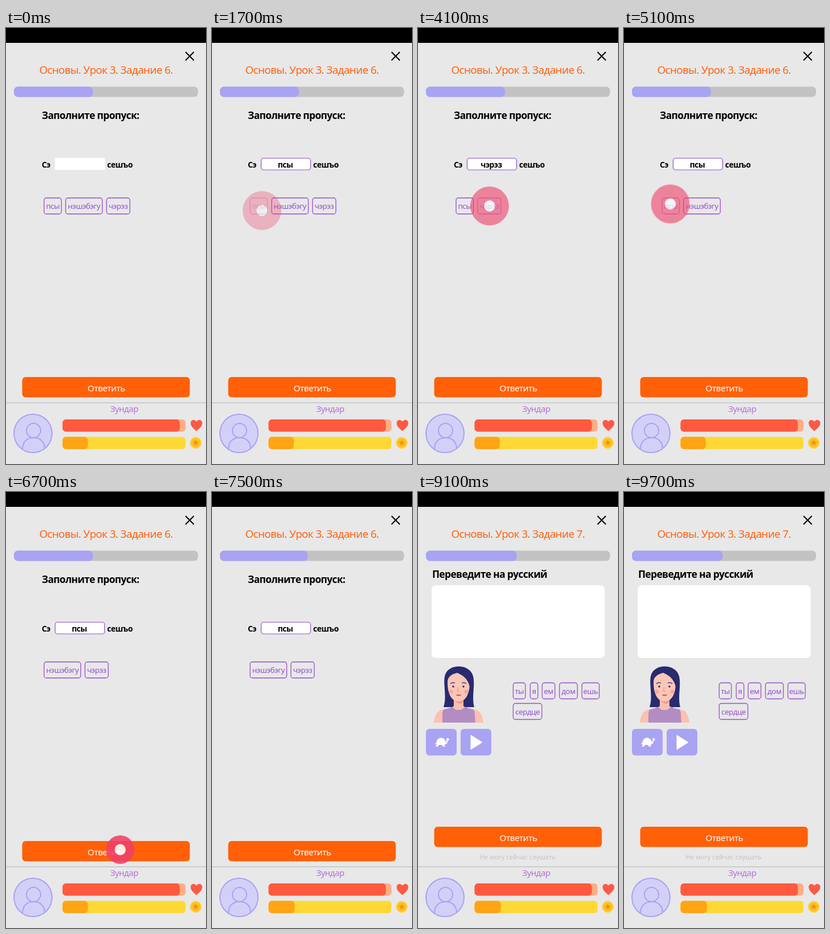
These frames come from a looping animation (352 px wide and 762 px high, 9800 ms). An HTML page:

```html
<!DOCTYPE html>
<html lang="ru">
<head>
<meta charset="utf-8">
<title>Урок</title>
<style>
  html, body { margin: 0; width: 100%; height: 100%; overflow: hidden; background: #e8e8e8; }
  svg { display: block; width: 352px; height: 762px; }
  text { font: 13.3px "Noto Sans", "Open Sans", sans-serif; letter-spacing: -.035em; }
  .mid { text-anchor: middle; }
  .title { font-size: 18.9px; fill: #ff6410; }
  .head { font-size: 17.4px; font-weight: 700; }
  .word { font-size: 13.9px; font-weight: 700; }
  .label { font-size: 15.3px; fill: #fff; }
  .name { font-size: 15px; fill: #b66ee0; }
  .note { font-size: 11.3px; letter-spacing: 0; fill: #c3c3c3; }
  .chip rect { fill: none; stroke: #9450cf; stroke-width: 1.3; }
  .chip text { fill: #9450cf; }
  .lilac { fill: #a8a3f3; }
  .accent { fill: #ff6008; }
</style>
</head>
<body>
<svg viewBox="0 0 352 762">
  <rect width="352" height="762" fill="#e8e8e8"/>
  <rect width="352" height="26" fill="#000"/>
  <path d="M316.5 42.5l13.5 13.5m0-13.5l-13.5 13.5" stroke="#000" stroke-width="2.1" stroke-linecap="round"/>
  <rect x="14" y="102.5" width="324" height="18" rx="7" fill="#c3c3c3"/>
  <rect id="progress" class="lilac" x="14" y="102.5" width="139" height="18" rx="7"/>

  <g id="fillTask">
    <text class="title mid" x="176" y="80">Основы. Урок 3. Задание 6.</text>
    <text class="head" x="63" y="159">Заполните пропуск:</text>
    <text class="word" x="63" y="243.5">Сэ</text>
    <text class="word" x="178" y="243.5">сешъо</text>
    <rect x="86" y="227" width="88" height="21" fill="#fff"/>
    <g id="filled">
      <rect x="85.5" y="226.5" width="89" height="22" fill="#e8e8e8"/>
      <rect x="86.5" y="227.5" width="87" height="20.5" rx="4" fill="#fff" stroke="#9450cf" stroke-width="1.2"/>
    </g>
    <g id="answers"></g>
    <g id="options"></g>
    <rect class="accent" x="28.5" y="610" width="295" height="35.5" rx="6"/>
    <text class="label mid" x="176.5" y="634.5">Ответить</text>
  </g>

  <g id="translateTask">
    <text class="title mid" x="176" y="80">Основы. Урок 3. Задание 7.</text>
    <text class="head" x="25" y="150">Переведите на русский</text>
    <rect x="24" y="163" width="304.5" height="127" rx="7" fill="#fff"/>
    <g id="portrait">
      <path d="M45 376C51 358 44 336 47 322C52 299 91 299 97 322C101 338 94 358 99 376Z" fill="#292b70"/>
      <path d="M63 357h17v17c6 6 18 5 25 8 7 4 9 13 10 21H28c1-8 3-17 10-21 7-3 19-2 25-8Z" fill="#fbc0b0"/>
      <path d="M45 380c7-1 12-3 16-5 3 8 18 8 21 0 4 2 9 4 16 5 3 5 2 16 3 23H43c0-7-1-18 2-23Z" fill="#b48cc4"/>
      <path d="M63 362c5 5 12 5 17 0l-1 6c-5 4-11 2-16-6Z" fill="#f09a92"/>
      <path d="M52 333c0-15 8-20 20-20s19 6 19 20c0 18-6 33-19.5 33S52 351 52 333Z" fill="#fbc7b7"/>
      <path d="M51 344c-2-17 4-25 18-28 8 4 19 8 23 28 4-25-6-37-21-36-17 0-25 13-20 36Z" fill="#292b70"/>
      <g fill="#f6a7a2"><circle cx="58" cy="349" r="3.5"/><circle cx="85" cy="349" r="3.5"/></g>
      <g fill="#292b70"><circle cx="62" cy="340" r="1.7"/><circle cx="80" cy="340" r="1.7"/></g>
      <path d="M57 335q4-3 8-1m12 0q5-2 8 1" fill="none" stroke="#292b70" stroke-width="1.3"/>
      <path d="M71 341l-2 7h4" fill="none" stroke="#ee8c83"/>
      <path d="M66 354q5 5 11 0Z" fill="#e3524f"/>
    </g>
    <g id="wordBank"></g>
    <rect class="lilac" x="14" y="414" width="54" height="46.5" rx="6"/>
    <rect class="lilac" x="75" y="414" width="54" height="46.5" rx="6"/>
    <g fill="#fff">
      <path d="M93 425l20 12.5-20 12.5Z" stroke="#fff" stroke-linejoin="round"/>
      <path d="M32 439c1-12 15-13 17-1 2-2 0-8 3-8 4 0 3 5 0 5 0 5-4 7-6 7l2 3h-4l-2-3h-5l-2 3h-4l2-4-4-1Z"/>
    </g>
    <rect class="accent" x="28.5" y="585" width="295" height="35.5" rx="6"/>
    <text class="label mid" x="176.5" y="609.5">Ответить</text>
    <text class="note mid" x="175.5" y="642">Не могу сейчас слушать</text>
  </g>

  <path d="M0 655h352" stroke="#c5c5c5" stroke-width="1.3"/>
  <text class="name mid" x="208" y="670.5">Зундар</text>
  <g fill="#d3d0f8" stroke="#a8a3f3" stroke-width="2">
    <circle cx="47.5" cy="708.5" r="33.5"/>
    <path d="M29 736c0-14 9-20 19.5-20S68 722 68 735" fill="none"/>
    <circle cx="48.5" cy="703.5" r="12.5"/>
  </g>
  <rect x="99.5" y="684" width="216.5" height="21.5" rx="6" fill="#ffad84"/>
  <rect x="99.5" y="684" width="206.5" height="21.5" rx="6" fill="#ff5a40"/>
  <rect x="99.5" y="714.5" width="216.5" height="21.5" rx="6" fill="#ffd836"/>
  <rect id="coins" x="99.5" y="714.5" width="44.5" height="21.5" rx="6" fill="#ffa514"/>
  <path d="M335 704.5C330 700 325 696 325 690.5c0-6 7-7.500 10-2.500 3-5 10.500-3.500 10.500 2.500 0 5.500-5.500 9.500-10.500 14Z" fill="#fb5a45"/>
  <circle cx="334" cy="725" r="9.300" fill="#ffbf24" stroke="#ffd33a" stroke-width="2"/>
  <path id="star" fill="#e99b12"/>
  <g id="taps"></g>
</svg>

<script>
const LOOP = 9800, CUT = 7700;
const $ = id => document.getElementById(id);

function add(parent, markup) {
  parent.insertAdjacentHTML('beforeend', markup);
  return parent.lastElementChild;
}

// steps: [time, value] pairs; equal times make a hard change
function play(el, prop, steps, format = v => v) {
  const all = [[0, steps[0][1]], ...steps, [LOOP, steps[steps.length - 1][1]]];
  el.animate(all.map(([t, v]) => ({ offset: t / LOOP, [prop]: format(v) })),
    { duration: LOOP, iterations: Infinity });
}

function show(el, ...spans) {
  play(el, 'opacity', spans.flatMap(([from, to]) =>
    [[from, from ? 0 : 1], [from, 1], [to, 1], [to, to < LOOP ? 0 : 1]]));
}

const shift = v => `translateX(${v}px)`;
const px = v => `${v}px`;

function chip(parent, word, x, y, width) {
  return add(parent, `<g class="chip"><rect x="${x}" y="${y}" width="${width}" height="28" rx="4"/>
    <text class="mid" x="${x + width / 2}" y="${y + 19}">${word}</text></g>`);
}

// Cloze task
const options = [
  { word: 'псы', x: 67, w: 30.5, fade: [[1500, 1], [1800, 0], [3100, 0], [3350, 1], [5000, 1], [5300, 0]],
    move: [[0, 0]], chosen: [[1550, 2750], [5050, LOOP]] },
  { word: 'нэшэбэгу', x: 105, w: 64.5, fade: [[2700, 1], [2950, 0], [4200, 0], [4500, 1]],
    move: [[1800, 0], [2100, -38], [3500, -38], [3500, 0], [5300, 0], [5600, -38]], chosen: [[2750, 4050]] },
  { word: 'чэрэз', x: 177, w: 41, fade: [[4000, 1], [4300, 0], [5400, 0], [5700, 1]],
    move: [[1800, 0], [2100, -38], [2880, -38], [3220, -72], [4500, -72], [4500, -38]], chosen: [[4050, 5050]] }
];
for (const o of options) {
  const el = chip($('options'), o.word, o.x, 297, o.w);
  play(el, 'opacity', o.fade);
  play(el, 'transform', o.move, shift);
  show(add($('answers'), `<text class="word mid" x="129" y="243.5">${o.word}</text>`), ...o.chosen);
}
show($('filled'), [1550, LOOP]);

// Translation task
[['ты', 167.5, 21.5], ['я', 197.5, 13.5], ['ем', 218.5, 22.5], ['дом', 249, 31.5], ['ешь', 288.5, 30.5]]
  .forEach(([word, x, w]) => chip($('wordBank'), word, x, 333.5, w));
chip($('wordBank'), 'сердце', 167.5, 369.5, 50.5);

show($('fillTask'), [0, CUT]);
show($('translateTask'), [CUT, LOOP]);
play($('progress'), 'width', [[7200, 139], [7600, 159.5]], px);
play($('coins'), 'width', [[7200, 44.5], [7600, 46.5]], px);

$('star').setAttribute('d', 'M' + Array.from({ length: 10 }, (_, i) => {
  const r = i % 2 ? 2.7 : 5.8, a = i * Math.PI / 5;
  return [334 + r * Math.sin(a), 725 - r * Math.cos(a)].map(v => v.toFixed(2));
}).join('L') + 'Z');

// Touches: x, y, press time, release time
const taps = [
  [88, 319, 1300, 1500], [99, 311, 2700, 2700], [126, 311, 3900, 4000],
  [81.5, 307.5, 4800, 5000], [201, 625, 6700, 6900], [285, 591, 9300, 9370]
];
for (const [x, y, press, release] of taps) {
  const tap = add($('taps'), `<g transform="translate(${x} ${y})"><g>
    <circle r="34" fill="#ee4068"/></g><circle r="9.700" fill="#fff"/></g>`);
  play(tap, 'opacity', [[press, 0], [press, .88], [release, .88], [release + 320, 0]]);
  play(tap.firstElementChild, 'transform', [[press, .73], [press + 100, 1]], v => `scale(${v})`);
}
</script>
</body>
</html>
```
